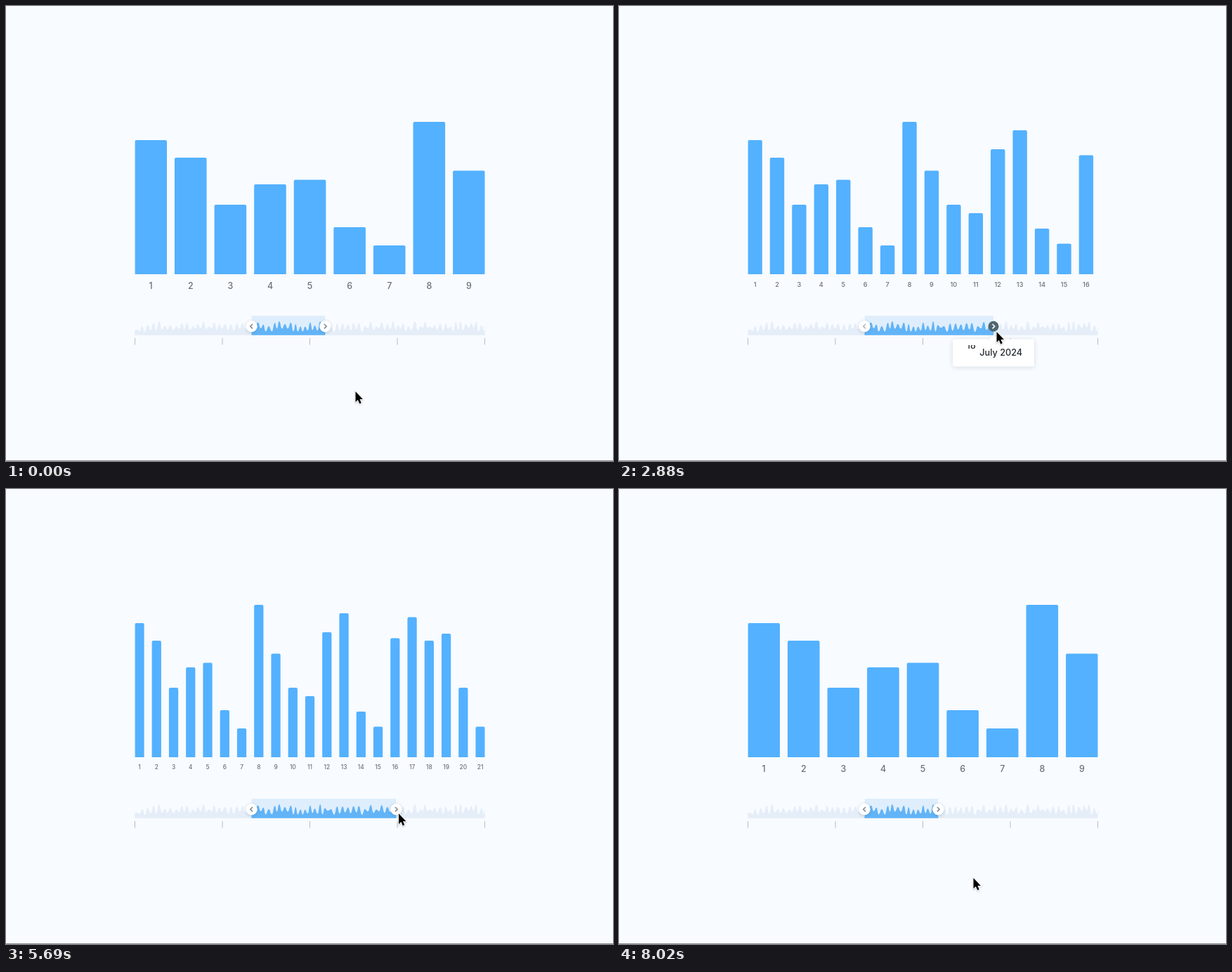
These frames come from a looping animation (864 px wide and 648 px high, 8110 ms). An HTML page with a canvas:

```html
<!DOCTYPE html>
<html lang="en">
<head>
<meta charset="utf-8">
<title>Range chart</title>
<style>
html, body { margin: 0; width: 100%; height: 100%; overflow: hidden; background: #f8fbff; }
canvas { display: block; }
</style>
</head>
<body>
<canvas id="stage" width="864" height="648"></canvas>
<script>
const ctx = document.getElementById('stage').getContext('2d');
const LOOP = 8110, LEFT = 183.4, RIGHT = 681.7, BASE = 382, GAP = 11;
const FONT = 'Inter, "Open Sans", sans-serif';
const FROM = 349.5, WAVE_BASE = 468.8;

// Bar heights for days 1 to 21
const values = [191, 166, 99, 128, 134.5, 67, 41, 217, 147.5, 99, 87,
  178, 205, 65, 43.5, 169.5, 199.5, 166, 176, 99, 43.5];

// Eased 0 to 1 between two times
function ease(t, from, to) {
  const u = Math.min(1, Math.max(0, (t - from) / (to - from)));
  return (1 - Math.cos(Math.PI * u)) / 2;
}

const pulse = (t, on, up, off, down) => ease(t, on, up) - ease(t, off, down);
const zoom = t => pulse(t, 1521, 3498, 6200, 6885);
const hover = t => pulse(t, 620, 810, 3520, 3690) + pulse(t, 5680, 5880, 6850, 6960);
const tip = t => pulse(t, 1250, 1430, 3520, 3690) + pulse(t, 6130, 6300, 6850, 6960);

// Smooth monotone curve through [time, value] keys
function track(keys) {
  const slope = i => keys[i] && keys[i + 1]
    ? (keys[i + 1][1] - keys[i][1]) / (keys[i + 1][0] - keys[i][0]) : 0;
  const tangent = i => {
    const a = slope(i - 1), b = slope(i);
    return a * b > 0 ? 2 * a * b / (a + b) : 0;
  };
  return t => {
    const i = keys.findIndex((k, n) => t < keys[n + 1][0]);
    const [t0, v0] = keys[i], [t1, v1] = keys[i + 1];
    const d = t1 - t0, u = (t - t0) / d, w = 1 - u;
    return v0 * (1 + 2 * u) * w * w + v1 * u * u * (3 - 2 * u)
      + d * u * w * (tangent(i) * w - tangent(i + 1) * u);
  };
}

// Cursor stops: time, x, y
const stops = [[0, 497.5, 549], [810, 461.5, 458], [1400, 461.5, 458],
  [3790, 574, 467], [4430, 574, 467], [4560, 585.5, 467], [4950, 630, 530],
  [5310, 602, 481], [5880, 549, 459], [6180, 549, 459], [7060, 410, 460],
  [7440, 410, 460], [8020, 504.5, 554], [LOOP, 497.5, 549]];
const cursorX = track(stops.map(([t, x]) => [t, x]));
const cursorY = track(stops.map(([t, , y]) => [t, y]));

let seed = 7;
const random = () => (seed = seed * 16807 % 2147483647) / 2147483647;

// Overview wave: alternating random peaks and dips, low at the left edge
const wave = new Path2D();
wave.moveTo(LEFT, WAVE_BASE);
wave.lineTo(LEFT, 461);
for (let x = LEFT, y = 461, up = true; x < RIGHT; up = !up) {
  const nx = Math.min(RIGHT, x + 3 + random() * 1.6), mid = (x + nx) / 2;
  const ny = (up ? 449 + random() * 8 : 458 + random() * 6) + Math.max(0, (205 - nx) / 4);
  wave.bezierCurveTo(mid, y, mid, ny, nx, ny);
  x = nx;
  y = ny;
}
wave.lineTo(RIGHT, WAVE_BASE);
wave.closePath();

function rect(x, y, w, h, color) {
  ctx.fillStyle = color;
  ctx.fillRect(x, y, w, h);
}

function text(str, x, y, size, color, align) {
  ctx.font = `500 ${size}px ${FONT}`;
  ctx.textAlign = align;
  ctx.fillStyle = color;
  ctx.fillText(str, x, y);
}

function shadow(color, blur) {
  ctx.shadowColor = color;
  ctx.shadowBlur = blur;
  ctx.shadowOffsetY = 1;
}

function clipped(x, y, w, h, draw) {
  ctx.save();
  ctx.beginPath();
  ctx.rect(x, y, w, h);
  ctx.clip();
  draw();
  ctx.restore();
}

function drawBars(p) {
  const span = RIGHT - LEFT + GAP;
  const pitch = span / 9 + (span / 21 - span / 9) * p;
  const w = pitch - GAP, size = 12.4 - 4.1 * p;
  clipped(LEFT, 150, RIGHT - LEFT, 270, () => values.forEach((value, i) => {
    const x = LEFT + i * pitch;
    ctx.fillStyle = '#53b1ff';
    ctx.beginPath();
    ctx.roundRect(x, BASE - value, w, value, [2, 2, 0, 0]);
    ctx.fill();
    text(i + 1, x + w / 2, 398.5 - 3 * p + size * .364, size, '#6c7074', 'center');
  }));
}

function drawOverview(end) {
  ctx.fillStyle = '#e5eef8';
  ctx.fill(wave);
  clipped(FROM, 441, end - FROM, 28, () => {
    rect(FROM, 441, end - FROM, 28, '#dfeefc');
    ctx.fillStyle = '#62b4f7';
    ctx.fill(wave);
  });
  for (let i = 0; i < 5; i++) rect(183 + i * 124.5, 473, 1, 9.5, '#b8bec4');
}

function disc(x, r, color, alpha) {
  ctx.globalAlpha = alpha;
  ctx.fillStyle = color;
  ctx.beginPath();
  ctx.arc(x, 456.2, r, 0, Math.PI * 2);
  ctx.fill();
}

function chevron(x, dir, color, alpha) {
  ctx.globalAlpha = alpha;
  ctx.strokeStyle = color;
  ctx.lineWidth = 1.6;
  ctx.beginPath();
  ctx.moveTo(x - 1.5 * dir, 453);
  ctx.lineTo(x + 1.7 * dir, 456.2);
  ctx.lineTo(x - 1.5 * dir, 459.4);
  ctx.stroke();
}

function drawHandle(x, dir, dark, fade) {
  ctx.save();
  shadow('rgba(70,95,120,.28)', 4);
  disc(x, 8.2, '#fff', 1 - dark);
  ctx.shadowColor = 'transparent';
  disc(x, 7.5, '#506670', dark);
  chevron(x, dir, '#85898d', (1 - dark) * (1 - fade));
  chevron(x, dir, '#fff', dark);
  ctx.restore();
}

function drawTip(x, p, alpha) {
  ctx.save();
  ctx.globalAlpha = alpha;
  shadow('rgba(70,95,120,.2)', 6);
  ctx.fillStyle = '#fff';
  ctx.beginPath();
  ctx.roundRect(x - 58, 474.5, 116, 39, 3);
  ctx.moveTo(x - 6, 474.5);
  ctx.lineTo(x, 468.5);
  ctx.lineTo(x + 6, 474.5);
  ctx.fill();
  ctx.shadowColor = 'transparent';
  text('July 2024', x - 19.7, 498.4, 12.7, '#24292e', 'left');
  const day = 9 + 12 * p;
  clipped(x - 44, 483, 24, 24, () => {
    for (let d = Math.floor(day); d <= Math.ceil(day); d++)
      text(d, x - 31.7, 499 + (d - day) * 32, 12.4, '#24292e', 'center');
  });
  ctx.restore();
}

const arrow = new Path2D('M0 0V15L3.4 11.9L5.7 17.3L8.2 16.2L6 11H10.4Z');

function drawCursor(x, y) {
  ctx.save();
  ctx.translate(x, y);
  shadow('rgba(0,0,0,.25)', 2);
  ctx.strokeStyle = '#fff';
  ctx.lineWidth = 1.6;
  ctx.stroke(arrow);
  ctx.shadowColor = 'transparent';
  ctx.fillStyle = '#000';
  ctx.fill(arrow);
  ctx.restore();
}

function draw(t) {
  const p = zoom(t), end = 454.4 + 101 * p, h = hover(t);
  rect(0, 0, 864, 648, '#f8fbff');
  rect(0, 647, 864, 1, '#8b8f93');
  drawBars(p);
  drawOverview(end);
  drawTip(end, p, tip(t));
  drawHandle(FROM, -1, 0, h * .4);
  drawHandle(end, 1, h, 0);
  drawCursor(cursorX(t), cursorY(t));
}

const start = performance.now();
function frame() {
  draw((performance.now() - start) % LOOP);
  requestAnimationFrame(frame);
}
frame();
</script>
</body>
</html>
```
